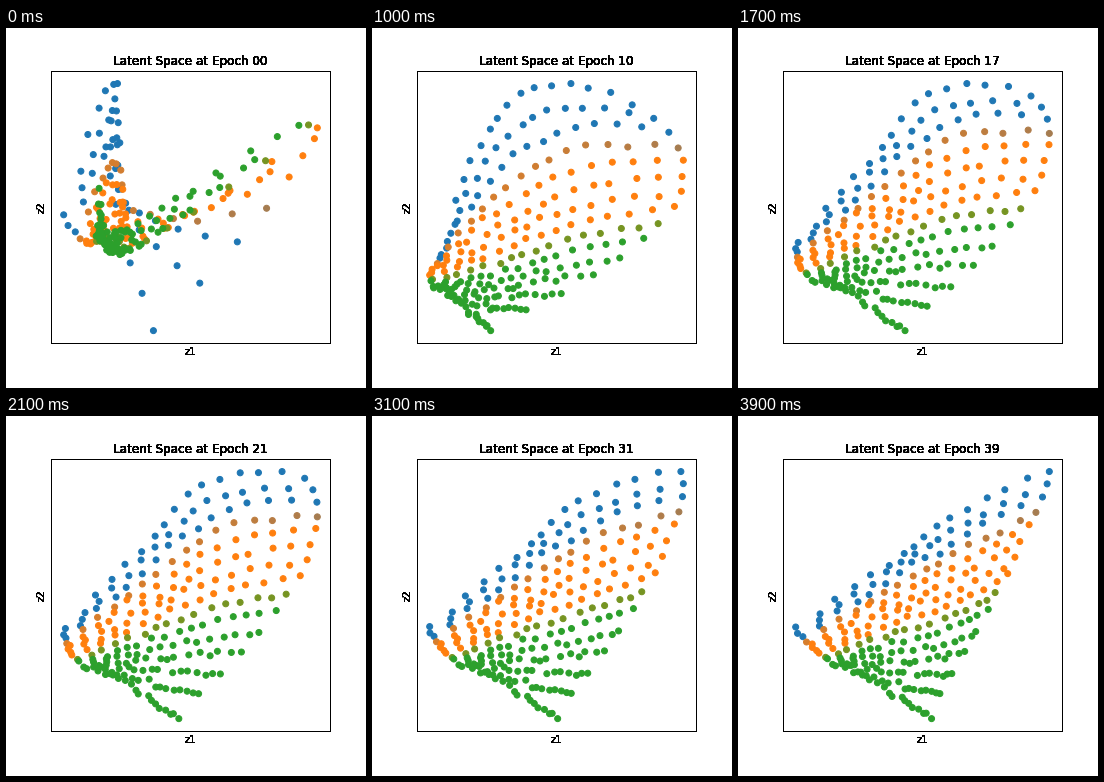
Write a matplotlib script that moves like this. It is 360 by 360 pixels and loops after 4 s.

```python
import numpy as np
import matplotlib.pyplot as plt
from matplotlib.animation import FuncAnimation

COLS, ROWS, EPOCHS = 16, 15, 40
COL_NODES = np.array([0, 6, 10, 15])
ROW_NODES = np.array([0, 8, 14])

BLUE, ORANGE, GREEN = (np.array(c) / 255 for c in
                       ((31, 119, 180), (255, 127, 14), (44, 160, 44)))

# Key points of the sheet by epoch: blue edge, orange-green border, green edge.
POSES = {
    0: [[(58, 188), (112, 56), (106, 150), (150, 303)],
        [(90, 214), (112, 212), (140, 215), (311, 98)],
        [(93, 165), (105, 215), (110, 205), (125, 205)]],
    5: [[(60, 268), (141, 75), (175, 72), (275, 69)],
        [(65, 243), (150, 247), (200, 229), (287, 217)],
        [(80, 270), (92, 288), (100, 298), (115, 300)]],
    10: [[(78, 221), (120, 100), (165, 60), (262, 76)],
         [(62, 252), (140, 232), (195, 213), (289, 196)],
         [(75, 264), (98, 284), (108, 292), (118, 302)]],
    17: [[(66, 216), (148, 120), (195, 68), (296, 69)],
         [(72, 246), (150, 215), (205, 194), (287, 182)],
         [(100, 260), (128, 274), (148, 290), (168, 302)]],
    39: [[(58, 213), (165, 138), (212, 104), (311, 56)],
         [(86, 243), (155, 219), (204, 205), (258, 178)],
         [(112, 255), (150, 278), (170, 290), (190, 303)]],
}


def spline_weights(nodes, count):
    """Cubic Hermite weights of each node at positions 0..count-1."""
    t = np.arange(count)
    k = np.clip(np.searchsorted(nodes, t, "right") - 1, 0, len(nodes) - 2)
    h = (nodes[k + 1] - nodes[k])[:, None]
    s = (t - nodes[k])[:, None] / h
    value = np.eye(len(nodes))
    slope = np.gradient(value, nodes, axis=0, edge_order=2)
    return ((1 + 2 * s) * (1 - s) ** 2 * value[k]
            + s * (1 - s) ** 2 * h * slope[k]
            + s ** 2 * (3 - 2 * s) * value[k + 1]
            + s ** 2 * (s - 1) * h * slope[k + 1])


ROW_WEIGHTS = spline_weights(ROW_NODES, ROWS)
COL_WEIGHTS = spline_weights(COL_NODES, COLS)
JITTER = np.random.default_rng(4).normal(0, 1.5, (ROWS * COLS, 2))
TIMES = list(POSES)


def cloud(epoch):
    """Points at an epoch, scaled to fill the unit square."""
    k = min(np.searchsorted(TIMES, epoch, "right") - 1, len(TIMES) - 2)
    s = (epoch - TIMES[k]) / (TIMES[k + 1] - TIMES[k])
    if k == 0:
        s = 1 - (1 - s) ** 2  # the sheet unfolds quickly at first
    start, end = (np.array(POSES[t], float) for t in TIMES[k:k + 2])
    net = start + s * (end - start)
    points = np.einsum("ra,abx,cb->rcx", ROW_WEIGHTS, net, COL_WEIGHTS)
    points = points.reshape(-1, 2) + JITTER
    low, high = points.min(axis=0), points.max(axis=0)
    return (points - low) / (high - low)


def mix(a, b, part):
    return a + (b - a) * part


def dot_color(row, col):
    if row < 3:
        return BLUE
    if row == 3:
        return mix(BLUE, ORANGE, 0.82 - 0.22 * (col / (COLS - 1)) ** 3)
    if row < 8:
        return ORANGE
    if row == 8:
        return mix(ORANGE, GREEN, 0.65)
    return GREEN


fig = plt.figure(figsize=(5, 5), dpi=72, facecolor="white")
ax = fig.add_axes([0.125, 0.125, 0.775, 0.755])
ax.set(xlim=(-0.05, 1.05), ylim=(1.05, -0.05), xticks=[], yticks=[])
for spine in ax.spines.values():
    spine.set_linewidth(1)

colors = [dot_color(r, c) for r in range(ROWS) for c in range(COLS)]
dots = ax.scatter(*cloud(0).T, s=36, c=colors, linewidths=1)


def heavy_text(text, xy, offset, size, ha="center", va="baseline", rotation=0):
    """Stacked copies darken the soft glyph edges."""
    return [ax.annotate(text, xy, xycoords="axes fraction", xytext=offset,
                        textcoords="offset points", fontsize=size,
                        family="DejaVu Sans", ha=ha, va=va, rotation=rotation)
            for _ in range(16)]


titles = heavy_text("Latent Space at Epoch 00", (0.5, 1), (0, 6), 12)
heavy_text("z1", (0.5, 0), (0, -4), 10, va="top")
heavy_text("z2", (0, 0.5), (-4, 0), 10, ha="right", va="center", rotation=90)


def update(epoch):
    dots.set_offsets(cloud(epoch))
    for title in titles:
        title.set_text(f"Latent Space at Epoch {epoch:02d}")
    return [dots, *titles]


anim = FuncAnimation(fig, update, frames=EPOCHS, interval=100,
                     repeat=True, repeat_delay=0, blit=False)
plt.show()
```
